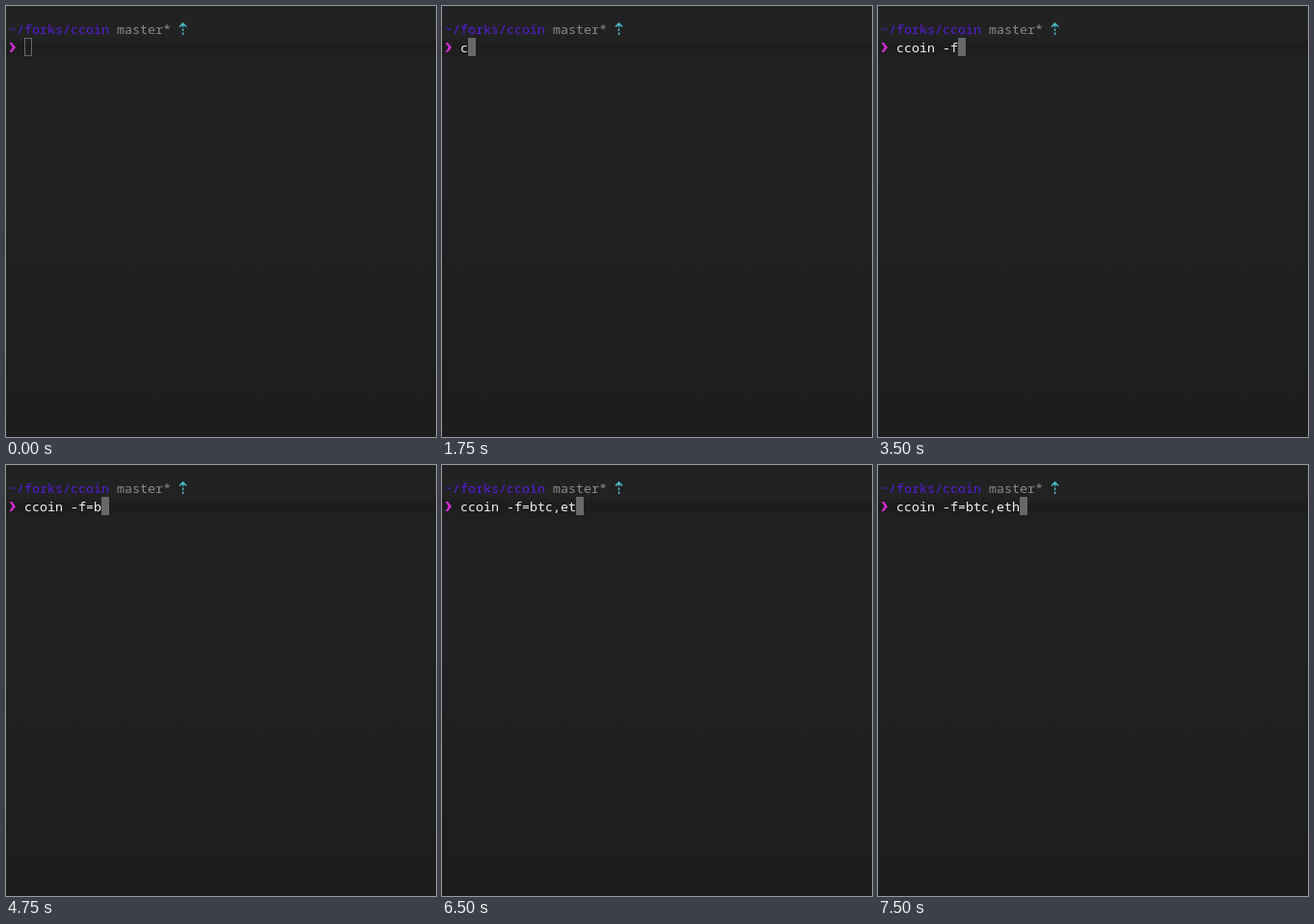
An HTML page that plays this animation: 446x447 px, repeating every 8000 ms.

```html
<!DOCTYPE html>
<html lang="en">
<head>
<meta charset="utf-8">
<title>Terminal</title>
<style>
  html, body { margin: 0; width: 100%; height: 100%; overflow: hidden; background: #1d1e1e; }
  svg { display: block; }
  text { font: 500 13.333px "Noto Sans Mono", "DejaVu Sans Mono", monospace; white-space: pre; font-variant-ligatures: none; }
</style>
</head>
<body>
<svg width="446" height="447" viewBox="0 0 446 447">
  <linearGradient id="shade" x2="0" y2="1">
    <stop offset="0" stop-color="#212223"/>
    <stop offset=".07" stop-color="#222223"/>
    <stop offset=".095" stop-color="#1c1c1c"/>
    <stop offset=".125" stop-color="#202123"/>
    <stop offset=".4" stop-color="#1f2123"/>
    <stop offset=".7" stop-color="#1e1f1f"/>
    <stop offset="1" stop-color="#1d1d1d"/>
  </linearGradient>
  <rect width="446" height="447" fill="url(#shade)"/>
  <text x="3" y="29" fill="#581be0">~/forks/ccoin</text>
  <text x="115" y="29" fill="#8b8b89">master*</text>
  <path d="M180 21.5L183.5 18L187 21.5M183.5 18V22M183.5 23.5V26M183.5 27.5V30" fill="none" stroke="#4fc4cf" stroke-width="1.4"/>
  <path d="M3.5 38H6L10 43L6 48H3.5L6.8 43Z" fill="#d62bd9"/>
  <text id="typed" x="19" y="48" fill="#f4f4f4"></text>
  <rect id="cursor" y="33.5" width="7" height="18" stroke="#686868"/>
</svg>
<script>
  const LOOP = 8000, FOCUS = 750, CELL = 8, LEFT = 19;
  const command = "ccoin -f=btc,eth";
  // Moment at which each character of the command appears
  const keys = [1750, 2000, 2000, 2000, 2250, 3000, 3250, 3500,
                4250, 4750, 5000, 5500, 6000, 6250, 6500, 7000];
  const typed = document.getElementById("typed");
  const cursor = document.getElementById("cursor");

  function draw(now) {
    const t = now % LOOP;
    const count = keys.filter(k => k <= t).length;
    typed.textContent = command.slice(0, count);
    cursor.setAttribute("x", LEFT + count * CELL + 0.5);
    cursor.setAttribute("fill", t < FOCUS ? "none" : "#686868");
    requestAnimationFrame(draw);
  }
  draw(performance.now());
</script>
</body>
</html>
```
